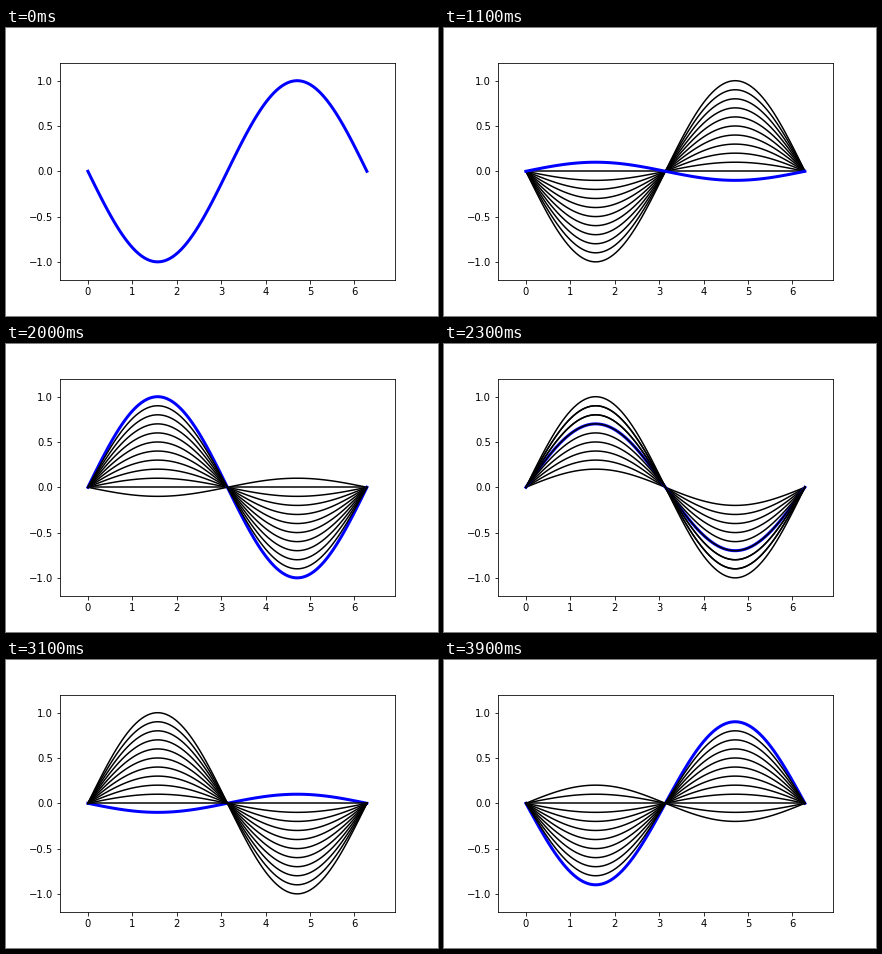
Animation, 432 px wide and 288 px high, one loop 4 s. Source, as a matplotlib script:

```python
import numpy as np
import matplotlib.pyplot as plt
from matplotlib.animation import FuncAnimation

FRAMES = 40
INTERVAL = 100
TRAIL = 11
WAVE_ORDER = 15  # older trail lines lie below the wave, later ones above

x = np.linspace(0, 2 * np.pi, 100)


def wave(step):
    """Sine whose amplitude runs linearly from -1 to 1 and back."""
    return (1 - abs(step - FRAMES / 2) / (FRAMES / 2) * 2) * np.sin(x)


fig, ax = plt.subplots(figsize=(6, 4), dpi=72, facecolor="white")
fig.subplots_adjust(left=0.125, right=0.9, bottom=0.125, top=0.88)
ax.set_xlim(-0.2 * np.pi, 2.2 * np.pi)
ax.set_ylim(-1.2, 1.2)
ax.set_xticks(range(7))
ax.set_yticks(np.arange(-1, 1.1, 0.5))

trail = [ax.plot([], [], color="black", lw=1.5)[0] for _ in range(TRAIL)]
current, = ax.plot([], [], color="blue", lw=3, zorder=WAVE_ORDER)


def update(frame):
    for age, line in enumerate(trail, start=1):
        step = frame - age
        line.set_visible(step >= 0)
        if step >= 0:
            line.set_data(x, wave(step))
            line.set_zorder(max(step, 2))
    current.set_data(x, wave(frame))
    return [*trail, current]


anim = FuncAnimation(fig, update, frames=FRAMES, interval=INTERVAL,
                     repeat=True, repeat_delay=0, blit=False)
plt.show()
```
